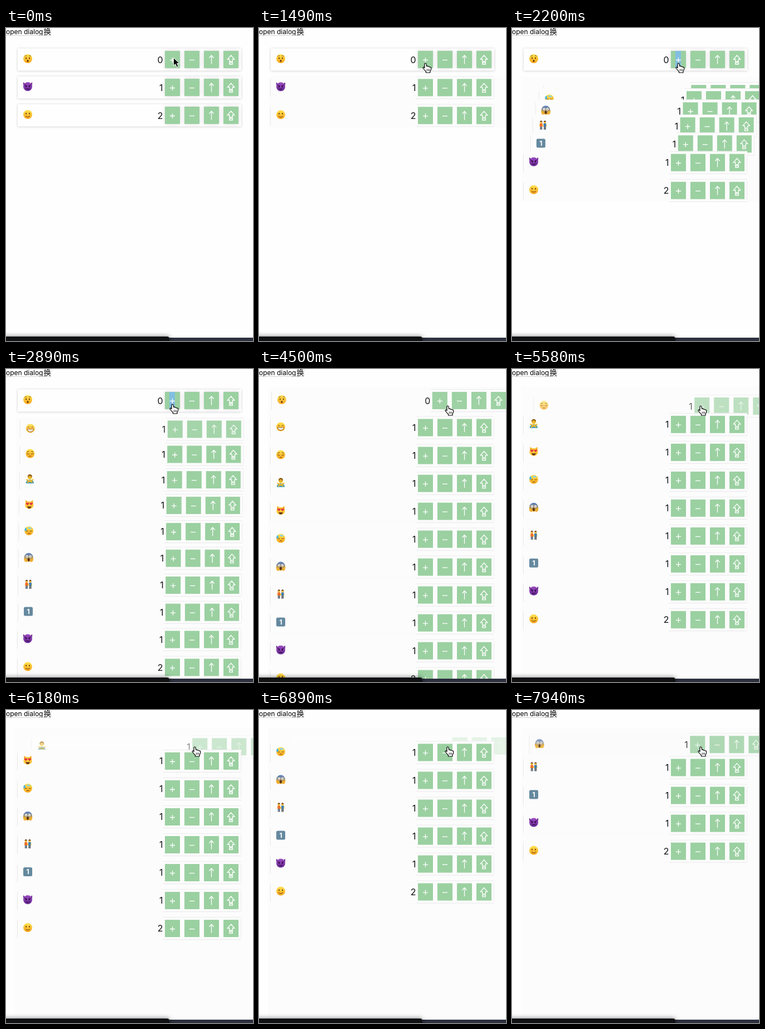
These frames come from a looping animation (443x561 px, 8 s). An HTML page with a canvas:

```html
<!DOCTYPE html>
<html lang="en">
<head>
<meta charset="utf-8">
<title>Animated list</title>
<style>
html, body { margin: 0; width: 443px; height: 561px; overflow: hidden; background: #fefefe; }
canvas { display: block; }
</style>
</head>
<body>
<canvas id="stage" width="443" height="561"></canvas>
<script>
const g = document.getElementById('stage').getContext('2d');
const LOOP = 8000, GAP = 50, TOP = 56.5, SHIFT = 50, LEAVE_SPAN = 850;
const ADD_TIMES = [1480, 1620, 1760, 1900, 2040, 2195, 2285, 2375];
const ADD_ICONS = ['one', 'pair', 'scream', 'sweat', 'cat', 'no', 'sad', 'grin'];
const REMOVE_TIMES = [4455, 4830, 5385, 5930, 6505, 7180, 7805];
const CLICKS = [
  ...ADD_TIMES.map((time, i) => ({ time, icon: ADD_ICONS[i], span: 820 })),
  ...REMOVE_TIMES.map(time => ({ time, span: 1000 }))
];

// cubic-bezier(.25, .1, .25, 1)
function ease(x) {
  if (x <= 0) return 0;
  if (x >= 1) return 1;
  let lo = 0, hi = 1, s;
  for (let i = 0; i < 22; i++) {
    s = (lo + hi) / 2;
    const bx = .75 * s * (1 - s) + s ** 3;
    if (bx < x) lo = s; else hi = s;
  }
  return .3 * s * (1 - s) ** 2 + 3 * s * s * (1 - s) + s ** 3;
}

// Each click restarts every row's transition from where the row is now.
// Only the newest row fades in; a later click makes it opaque at once.
function listAt(t) {
  const rows = [['wow', 0], ['devil', 1], ['smile', 2]].map(([icon, count]) => ({ icon, count, dx: 0, dy: 0 }));
  const leaving = [];
  let previous = null;
  const restAt = now => previous ? 1 - ease((now - previous.time) / previous.span) : 0;
  const settle = now => {
    const rest = restAt(now);
    for (const r of rows) { r.dx *= rest; r.dy *= rest; }
  };
  for (const click of CLICKS) {
    if (click.time > t) break;
    settle(click.time);
    if (click.icon) {
      rows.slice(1).forEach(r => r.dy -= GAP);
      rows.splice(1, 0, { icon: click.icon, count: 1, dx: SHIFT, dy: 15 });
    } else {
      const gone = rows.shift(), u = ease((t - click.time) / LEAVE_SPAN);
      if (u < 1) leaving.push({ ...gone, x: gone.dx + SHIFT * u, y: TOP + gone.dy, alpha: 1 - u, extra: 24 });
      rows.forEach(r => r.dy += GAP);
    }
    previous = click;
  }
  if (previous && previous.icon) rows[1].alpha = 1 - restAt(t);
  settle(t);
  rows.forEach((r, i) => { r.x = r.dx; r.y = TOP + GAP * i + r.dy; });
  return { rows, leaving };
}

function rect(x, y, w, h, color) { g.fillStyle = color; g.fillRect(x, y, w, h); }

function oval(x, y, rx, ry, color) {
  g.fillStyle = color;
  g.beginPath();
  g.ellipse(x, y, rx, ry, 0, 0, 7);
  g.fill();
}

function shape(d, fill, stroke, width = 1) {
  const p = new Path2D(d);
  if (fill) { g.fillStyle = fill; g.fill(p); }
  if (stroke) { g.strokeStyle = stroke; g.lineWidth = width; g.stroke(p); }
}

function ball(top, bottom) {
  const fill = g.createLinearGradient(0, -8, 0, 8);
  fill.addColorStop(0, top);
  fill.addColorStop(1, bottom);
  oval(0, 0, 8, 8, fill);
}

const BROWN = '#6b3a0c';
const face = () => ball('#ffe24f', '#f8a51d');
const eyes = (y, rx = 1, ry = 1.5, color = BROWN) => [-3, 3].forEach(x => oval(x, y, rx, ry, color));

const ICONS = {
  wow() {
    face(); eyes(-1, 1.1, 1.5);
    shape('M-5.5-4.5Q-3.5-6-2-5M2-5Q3.5-6 5.5-4.5', null, BROWN, .9);
    oval(0, 4, 1.6, 1.9, BROWN);
  },
  smile() {
    face(); eyes(-1.7);
    shape('M-4 2.5Q0 6.5 4 2.5', null, BROWN);
  },
  devil() {
    shape('M-7-1Q-9-6-7.5-8Q-6-5-3-5ZM7-1Q9-6 7.5-8Q6-5 3-5Z', '#6d2b93');
    ball('#9a4bc0', '#6a2a96');
    shape('M-5.5-3L-1.5-1M5.5-3L1.5-1', null, '#2c0b40', 1.2);
    eyes(0, 1.1, 1.3, '#2c0b40');
    shape('M-4.5 3Q0 7.5 4.5 3Q0 4.5-4.5 3Z', '#2c0b40');
  },
  grin() {
    face();
    shape('M-5-1.5Q-3.3-4.5-1.7-1.5M5-1.5Q3.3-4.5 1.7-1.5', null, BROWN);
    shape('M-5.5 1Q0 2 5.5 1Q5 6 0 6Q-5 6-5.5 1Z', '#fff', BROWN, .7);
    shape('M-5 3.5H5', null, '#b5a28d', .5);
  },
  sad() {
    face();
    shape('M-6 0Q-3.5 2-1.5 .5M6 0Q3.5 2 1.5 .5M-5.5-2.5L-2-4M5.5-2.5L2-4M-2 5Q0 3.8 2 5', null, BROWN);
  },
  no() {
    oval(0, -3.5, 3.9, 4.5, '#f9c52d');
    shape('M-4-3Q-4.5-8 0-8.2Q4.5-8 4-3Q2-6-1-5.5Q-3-5-4-3Z', '#8a5a1c');
    shape('M-7 8Q-7 2 0 1.5Q7 2 7 8Z', '#2793bd');
    shape('M-6.5 1L5 6.5M6.5 1L-5 6.5', null, '#f7b928', 2.2);
    oval(-1.5, -3, .6, .7, BROWN);
    oval(1.5, -3, .6, .7, BROWN);
  },
  cat() {
    shape('M-7 0L-6.5-8L-2-5ZM7 0L6.5-8L2-5Z', '#f4ad25');
    oval(0, 1, 7.7, 6.8, '#fbc638');
    for (const x of [-3.3, 3.3])
      shape(`M${x} 1.5L${x - 3}-2Q${x - 2}-4.5 ${x}-2.7Q${x + 2}-4.5 ${x + 3}-2Z`, '#e42f43');
    shape('M-3.8 3Q0 4 3.8 3Q3 7 0 7Q-3 7-3.8 3Z', '#62301d');
  },
  sweat() {
    face();
    shape('M-5.5 0Q-3.5 1.7-1.5 .3M5.5 0Q3.5 1.7 1.5 .3M-2 4.8Q0 3.5 2.5 4.8', null, BROWN);
    shape('M-6-6Q-9-1-7 0Q-4 1-4-2Q-4-4-6-6Z', '#43b5ec');
    shape('M-2-6Q2-7.5 5-4.5L4-3Q1-4-1-3.5Z', '#8bd3ef');
  },
  scream() {
    ball('#527bc6', '#f5b62a');
    eyes(-1.8, 2, 2.1, '#fff');
    eyes(-1.8, .7, .8, BROWN);
    oval(0, 4, 1.9, 3, '#5c3013');
    shape('M-8 1Q-5 1-3.7 5L-4 8Q-7 8-7.7 5ZM8 1Q5 1 3.7 5L4 8Q7 8 7.7 5Z', '#f7b62c', '#d78b1d', .5);
  },
  pair() {
    for (const [x, shirt, legs] of [[-3.3, '#ed6a2c', '#3f5064'], [3.3, '#397eb5', '#39454f']]) {
      rect(x - 1.8, 2, 1.5, 6, legs);
      rect(x + .3, 2, 1.5, 6, legs);
      rect(x - 2.4, -3.2, 4.8, 5.7, shirt);
      oval(x, -5.3, 2, 2.4, '#f6bc34');
      shape(`M${x - 2.1}-5Q${x - 2}-8 ${x}-8.2Q${x + 2}-8 ${x + 2.1}-5L${x}-6.7Z`, '#58351e');
      rect(x - 3.1, -1, 1, 3.5, '#f6bc34');
      rect(x + 2.1, -1, 1, 3.5, '#f6bc34');
    }
  },
  one() {
    g.fillStyle = '#65899f';
    g.beginPath();
    g.roundRect(-8, -8, 16, 16, 2.5);
    g.fill();
    text('1', 0, 4.5, 'bold 12px', '#fff', 'center');
  }
};

const GLYPHS = [
  'M-4.5 1H4.5M0-3.5V5.5',
  'M-4.5 1H4.5',
  'M0 8V-7M-4-3L0-7.5L4-3',
  'M0-7.5L6.2-.5H2.8V3.5H-2.8V-.5H-6.2ZM-2.8 5.5H2.8V8.5H-2.8Z'
];

function text(s, x, y, size, color, align) {
  g.font = size + ' Inter, sans-serif';
  g.fillStyle = color;
  g.textAlign = align;
  g.fillText(s, x, y);
}

function at(x, y, draw) {
  g.save();
  g.translate(x, y);
  draw();
  g.restore();
}

function glow(blur, alpha, draw) {
  g.save();
  g.shadowColor = `rgba(0,0,0,${alpha})`;
  g.shadowBlur = blur;
  draw();
  g.restore();
}

function drawRow({ icon, count, x, y, alpha = 1, extra = 0 }, still, selected) {
  g.save();
  g.globalAlpha = alpha;
  g.translate(x, y);
  if (still) {
    glow(4, .2, () => rect(21, -20, 401, 40, '#fefefe'));
  } else {
    rect(20, -20.5, 402 + extra, 41, '#fcfcfc');
    rect(282 + extra, -20.5, 140, 1, '#ececec');
    rect(282 + extra, 19.5, 140, 1, '#e8e8e8');
    rect(20, -15, 1, 32, '#e9e9e9');
    rect(421 + extra, -17, 1, 34, '#ececec');
  }
  at(39, -1.5, ICONS[icon]);
  text(count, 281.5 + extra, 6, '16px', '#111', 'right');
  GLYPHS.forEach((glyph, i) => {
    const left = 285 + 35 * i + extra;
    const button = () => rect(left, -15.5, 27, 31, '#9bd0a1');
    if (still) glow(6, .15, button); else button();
    if (!i && selected) rect(293, -15.5, 10, 31, '#82bfe0');
    at(left + 13.5, 0, () => shape(glyph, null, '#fff', 1.3));
  });
  g.restore();
}

function drawCursor(t) {
  if (t < 290) {
    at(300, 53, () => shape('M.5 .5V14.5L3.8 11.5L6.3 17L9 15.8L6.5 10.5H11Z', '#000', '#fff', 1));
    return;
  }
  const k = ease((t - 3880) / 440);
  at(293.5 + 40 * k, 62.5 + 3 * k, () => {
    g.lineJoin = 'round';
    shape('M3.5 9V2Q3.5 .5 5 .5Q6.3 .5 6.5 2L7.2 6Q9 5 10 6.7Q12 6 12.7 7.7Q15 7 15.3 9.5Q15.3 13 13.5 15V17.5H6V15.5Q3 12.5 .7 9.5Q0 7.5 2 7.5Z', '#fff', '#000', 1.2);
    shape('M7.7 11V14.5M9.9 11V14.5M12 11V14.5', null, '#000', .8);
  });
}

function drawBars() {
  rect(293, 555, 150, 6, '#2c303e');
  glow(8, .55, () => {
    g.fillStyle = '#101113';
    g.beginPath();
    g.roundRect(-10, 553, 303, 20, 4);
    g.fill();
  });
}

function render(t) {
  rect(0, 0, 443, 561, '#fefefe');
  text('open dialog', 0, 11, '12px', '#000', 'left');
  g.font = '13px "Noto Sans CJK SC", "Noto Sans CJK", sans-serif';
  g.fillText('换', 67.5, 11);
  rect(0, 13, 80, 1, '#d4d4d4');
  rect(80, 1, 1, 12, '#d4d4d4');

  const { rows, leaving } = listAt(t);
  const touched = t >= ADD_TIMES[0], removing = t >= REMOVE_TIMES[0];
  if (removing) rect(16, 32, 427, 523, '#fcfcfc');
  else if (touched) rect(18, 88, 425, rows[rows.length - 1].y - 67, '#fcfcfc');
  leaving.forEach(r => drawRow(r, false));
  rows.forEach((r, i) => drawRow(r, !touched || (!removing && i === 0), i === 0 && t >= 1600 && t < 3910));
  drawBars();
  drawCursor(t);
}

function tick() {
  render(performance.now() % LOOP);
  requestAnimationFrame(tick);
}
tick();
</script>
</body>
</html>
```
